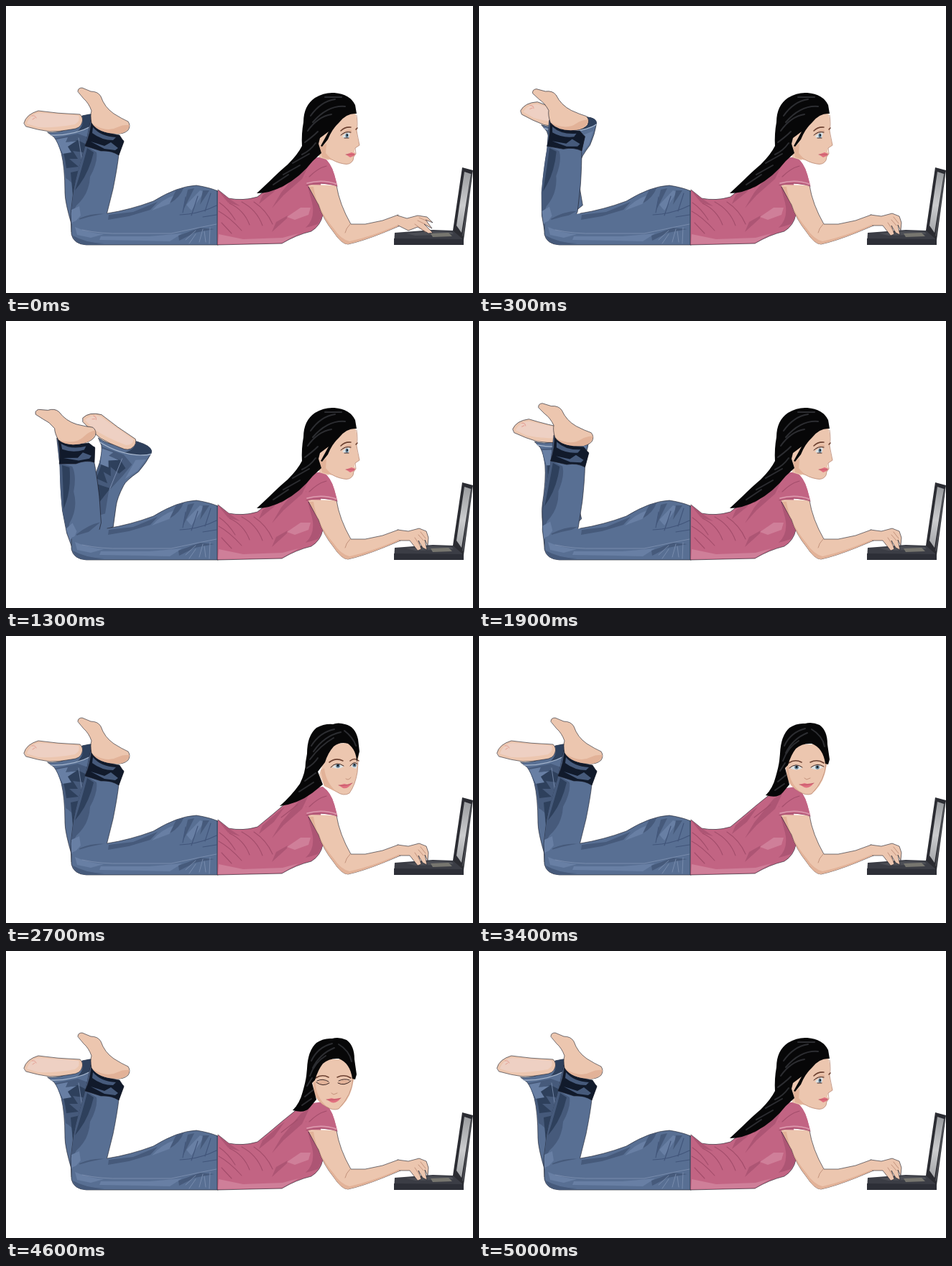
These frames come from a looping animation (650 px wide and 400 px high, 5.1 s). An HTML page without scripts:

```html
<!DOCTYPE html>
<html lang="en">
<head>
<meta charset="utf-8">
<title>Lying at the laptop</title>
<style>
html, body { margin: 0; width: 100%; height: 100%; overflow: hidden; background: #fff; }
svg { display: block; width: 650px; height: 400px; }

@property --swing { syntax: "<number>"; inherits: true; initial-value: 0; }

/* Denim */
.jean { fill: #586f93; }
.deep { fill: #465a7b; }
.navy { fill: #2e405c; }
.ink { fill: #111a2b; }
.pale { fill: #687fa4; }
.seam { fill: none; stroke: #8093b4; stroke-width: .8; }
.hem { fill: none; stroke: #a9b9d0; stroke-width: 1.2; }
.crease { fill: none; stroke: #41557a; stroke-width: 1.1; }
/* Shirt */
.shirt { fill: #c26483; }
.plum { fill: #ad5574; }
.rose { fill: #cf7f99; }
.fold { fill: none; stroke: #a34d6b; stroke-width: 1.1; }
/* Skin and face */
.skin { fill: #ecc6af; }
.tan { fill: #e2b298; }
.glow { fill: #eed0c3; }
.brow { fill: none; stroke: #6d4232; stroke-width: 1.6; }
.line { fill: none; stroke: #b17c66; stroke-width: .7; }
.lash { fill: none; stroke: #3a2726; stroke-width: 1; }
.lips { fill: #e0707f; }
.mouth { fill: none; stroke: #a8475a; stroke-width: .6; }
.iris { fill: #5d7a90; }
.hair { fill: #070708; }
.shine { fill: none; stroke: #2c2d31; stroke-width: 2; }
.edge { stroke: #1a1c28; stroke-width: .6; }
.white { fill: #dde2e4; }
path { stroke-linejoin: round; stroke-linecap: round; }

/* Motion */
svg { animation: swing 5100ms step-end infinite; }
.near { transform-origin: 105px 310px; transform: rotate(calc(var(--swing) * -1deg)); }
.far { transform-origin: 117px 298px; transform: rotate(calc(var(--swing) * 1.71deg)); }
.profile, .turned, .front, .open, .shut, .tap, .lift, .rest { animation: 5100ms step-end infinite; }
.profile { animation-name: profile; }
.turned { animation-name: turned; }
.front { animation-name: front; }
.open { animation-name: open; }
.shut { animation-name: shut; }
.tap { animation-name: tap; }
.lift { animation-name: lift; }
.rest { animation-name: rest; }

@keyframes swing {
  0% { --swing: 0; } 1.96% { --swing: 2.55; } 3.92% { --swing: 5.1; } 5.88% { --swing: 7.65; }
  9.8% { --swing: 10.2; } 11.76% { --swing: 12.75; } 13.72% { --swing: 15.3; }
  17.64% { --swing: 17.1; } 19.6% { --swing: 18.9; } 21.56% { --swing: 20.6; }
  25.49% { --swing: 18; } 27.45% { --swing: 15.5; } 29.41% { --swing: 13; }
  33.33% { --swing: 10.5; } 35.29% { --swing: 8; } 37.25% { --swing: 5.2; }
  41.17% { --swing: 2.6; } 43.13%, 100% { --swing: 0; }
}
@keyframes profile { 0%, 98.03%, 100% { opacity: 1; } 52.94% { opacity: 0; } }
@keyframes turned { 0%, 58.82%, 98.03%, 100% { opacity: 0; } 52.94%, 92.15% { opacity: 1; } }
@keyframes front { 0%, 92.15%, 100% { opacity: 0; } 58.82% { opacity: 1; } }
@keyframes open {
  0%, 66.66%, 74.5%, 80.39%, 92.15%, 100% { opacity: 1; }
  64.7%, 72.54%, 78.43%, 90.19% { opacity: 0; }
}
@keyframes shut {
  0%, 66.66%, 74.5%, 80.39%, 92.15%, 100% { opacity: 0; }
  64.7%, 72.54%, 78.43%, 90.19% { opacity: 1; }
}
@keyframes tap {
  0%, 9.8%, 19.6%, 33.33% { opacity: 1; }
  1.96%, 11.76%, 21.56%, 35.29%, 100% { opacity: 0; }
}
@keyframes lift {
  0%, 5.88%, 17.64%, 29.41%, 100% { opacity: 0; }
  3.92%, 13.72%, 27.45% { opacity: 1; }
}
@keyframes rest {
  0%, 3.92%, 9.8%, 13.72%, 19.6%, 27.45%, 33.33% { opacity: 0; }
  1.96%, 5.88%, 11.76%, 17.64%, 21.56%, 29.41%, 35.29%, 100% { opacity: 1; }
}
</style>
</head>
<body>
<svg viewBox="0 0 650 400" role="img" aria-label="Woman lying down and typing on a laptop">
  <defs>
    <linearGradient id="panel" x1="0" y1="0" x2="0" y2="1">
      <stop offset="0" stop-color="#9b9da0"/><stop offset=".55" stop-color="#cbccce"/><stop offset="1" stop-color="#a3a5a8"/>
    </linearGradient>
  </defs>

  <g class="far">
    <path class="jean edge" d="M58 176Q86 179 106 153L116 151Q131 149 132 157 133 172 130 188 121 208 122 215 123 235 128 246L139 272 119 298 92 307Q82 274 82 260 82 226 77 205 73 191 67 183Z"/>
    <path class="deep" d="M69 184L100 178 117 184 114 204 108 232 120 262 108 274Q95 245 83 240 81 218 77 205Z"/>
    <path class="navy" d="M76 192L100 187 112 193 108 204 93 202 100 213 88 213 101 224 84 226Q82 208 76 192M90 232L108 228 105 252 93 264Z"/>
    <path class="pale" d="M118 176L130 168 128 188 119 206ZM70 186L86 183 83 190 98 188 86 196 91 204 79 206Z"/>
    <path class="navy" d="M98 176Q110 166 106 153L116 151Q131 149 132 157 123 168 98 176"/>
    <path class="hem" d="M62 180Q94 181 120 167 130 161 132 158"/>
    <path class="seam" d="M101 184L108 230"/>
    <path class="skin edge" d="M25 163Q28 151 45 146 72 150 103 151 108 156 106 162 104 171 91 172 75 175 61 175 45 173 28 168Z"/>
    <path class="glow" d="M29 164Q34 150 47 149L101 153Q104 160 96 165 70 170 45 169Z"/>
    <path d="M36 153q5-1 6 3m-5 2l3-2" fill="none" stroke="#e5a095" stroke-width="1"/>
  </g>

  <g class="near">
    <path class="jean edge" d="M118 160L164 188 157 207Q155 225 149 255L140 291 122 320 100 327 91 315 90 290 94 258Q103 220 110 198Z"/>
    <path class="deep" d="M118 160L109 200Q98 235 94 258L90 292 98 278Q116 262 117 238 128 218 126 204L113 196 122 180Z"/>
    <path class="navy" d="M113 198L122 204Q116 230 103 248L96 257Q106 225 113 198"/>
    <path class="pale" d="M91 284L102 279 104 292 96 301 106 310 95 318 91 307Z"/>
    <path class="deep" d="M102 296Q122 288 139 290L119 298 104 306Z"/>
    <path class="ink edge" d="M119 158Q124 170 142 177L158 180 164 189 157 208Q147 201 132 202L110 195Q118 178 119 158"/>
    <path class="deep" d="M121 169Q132 182 153 183L149 187Q133 187 120 177ZM118 189L137 195 146 190 156 198 152 201 137 199Z"/>
    <path class="skin edge" d="M100 119Q100 114 106 114L118 119Q128 119 132 126 137 141 150 150 161 157 170 161 174 167 170 173 164 179 153 178 129 177 119 163 117 152 119 146 115 135 108 129Z"/>
    <path class="tan" d="M120 164Q140 177 155 169 163 165 172 166 171 172 164 176 158 179 153 178 129 177 120 164"/>
  </g>

  <g id="thigh">
    <path class="jean" d="M91 302Q111 293 141 289 173 284 205 272 239 251 265 250 284 253 295 258L295 333 112 333Q94 332 91 318Z"/>
    <path class="edge" fill="none" d="M91 304V318Q94 332 112 333H295M141 289Q173 284 205 272 239 251 265 250 284 253 295 258"/>
    <path class="pale" d="M132 321L200 321 245 317 228 328 190 327 130 326ZM96 308Q114 316 136 318L118 323 99 319ZM210 278Q226 264 241 263L227 276 203 285ZM251 277L270 257 276 259 258 285Z"/>
    <path class="deep" d="M143 291L177 287 211 273 201 284 171 293 142 298ZM237 256L247 254Q242 267 228 275ZM253 256L262 254 246 286ZM274 257L283 257 270 277ZM93 320Q110 330 137 331L112 333Q96 331 93 320ZM240 320L270 309 290 311 263 316 241 327Z"/>
    <path class="crease" d="M250 266L246 288M267 265L258 292M285 261L277 286M274 294L293 291M242 291Q269 290 293 278"/>
    <path class="seam" d="M106 312Q133 318 164 317L230 317Q258 311 293 304M250 326L264 313M264 318L255 331M269 329L274 311M276 314L278 329M283 331L284 309"/>
  </g>

  <g id="torso">
    <path class="shirt" d="M295 256L310 268Q330 272 350 266L367 252 386 236 413 214 441 210Q452 218 457 235L461 250 438 247 441 291Q438 306 425 314 404 319 384 331L294 333Z"/>
    <path class="edge" fill="none" d="M295 256L310 268Q330 272 350 266L367 252 386 236 411 216M441 291Q438 306 425 314 404 319 384 331L294 333V257"/>
    <path class="plum" d="M295 257L310 268 326 279 309 274ZM357 264L380 244 388 238 373 259 352 276ZM410 227L422 220 412 241 386 264 370 282 383 260ZM420 252L437 260 441 292 434 304Q425 307 417 309 431 296 426 274ZM376 301L392 292 391 296 370 315Z"/>
    <path class="rose" d="M391 294L410 281 424 281 421 291 402 298ZM296 318L330 325 385 323 407 317 384 330 295 332Z"/>
    <path class="fold" d="M297 274Q309 282 319 298M296 286Q311 294 328 313M311 275Q331 284 339 305M328 273Q349 284 357 306M345 273Q363 285 371 304M300 302L314 317M383 253L406 235M418 238Q428 230 447 227"/>
  </g>

  <g id="laptop">
    <path fill="#3b3d45" d="M541 316L594 312 623 313 637 323 637 333H540Z"/>
    <path fill="#2d2f37" d="M540 324L637 325V333H540Z"/>
    <path fill="#4c4e55" d="M557 317L592 314 620 315 623 318 570 320Z"/>
    <path fill="#77766f" d="M591 317L616 316 621 321 594 322Z"/>
    <path fill="#2b2c32" d="M635 225L650 229 637 326 622 313Z"/>
    <path fill="url(#panel)" d="M638 231L647 234 634 316 627 306Z"/>
    <path fill="none" stroke="#65676c" stroke-width="1" d="M648 234L636 320"/>
  </g>

  <g id="arm">
    <path class="skin" d="M420 249L460 250Q464 276 480 304L500 304 524 299 546 291 549 306 525 316Q495 328 476 332 467 332 456 315 442 298 435 277Z"/>
    <path class="edge" fill="none" d="M460 250Q464 276 480 304L500 304 524 299 546 291M549 306L525 316Q495 328 476 332 467 332 456 315 442 298 435 277L421 252"/>
    <path class="tan" d="M422 252L428 252Q432 281 456 310 466 325 478 328 510 321 548 304L548 306 525 316Q495 328 476 332 467 332 456 315 442 298 435 277Z"/>
    <path class="line" d="M479 304Q473 310 472 316"/>
    <path class="shirt" d="M441 211Q452 217 457 235L461 250 441 246 418 250 418 236Q425 220 441 211"/>
    <path fill="none" stroke="#dd9db0" stroke-width="1.6" d="M419 247Q440 241 460 248"/>
    <path class="fold" d="M418 250Q439 244 461 251M422 238Q434 226 446 223"/>
  </g>

  <g id="hand">
    <g class="tap">
      <path class="skin edge" d="M545 292L558 296 573 292 586 294 594 302 584 298 593 310 582 304 594 316 588 317 573 308 560 313 546 306"/>
      <path class="line" d="M573 299L583 304M569 304L584 315M575 295L587 300"/>
    </g>
    <g class="lift">
      <path class="skin edge" d="M545 292L558 285 573 281 584 284 590 290 577 288 591 298 588 301 576 294 583 303 576 302 567 299 557 305 546 306"/>
      <path class="line" d="M567 287L578 289M565 291L577 295M563 296L574 301"/>
    </g>
    <g class="rest">
      <path class="skin edge" d="M545 291L560 293 575 289 585 293 588 302 587 313 583 305 586 319 580 316 574 306 578 318 573 320 562 306 548 306"/>
      <path class="line" d="M574 298L581 306M569 302L577 314M577 294L584 303"/>
    </g>
  </g>

  <g class="profile">
    <path class="skin" d="M485 146Q490 158 488 172L489 182 492 194 486 198 485 203 487 206 484 210 483 215Q479 222 470 220 458 218 449 211L449 215 436 211 434 186 457 160 470 150Z"/>
    <path class="line" d="M488 152Q490 165 488 174L492 194 486 198 487 206 484 210 483 215Q479 222 470 220 458 218 449 211"/>
    <path class="tan" d="M437 196L446 192 445 205 454 215 440 211Z"/>
    <path class="brow" d="M466 174Q472 168 480 169M487 172L489 170"/>
    <path class="tan" d="M467 180Q473 170 481 173L480 178Z"/>
    <path class="white" d="M468 182Q473 175 479 177L477 184 471 184Z"/>
    <ellipse class="iris" cx="474.5" cy="180.5" rx="2" ry="3"/><circle cx="475" cy="180" r="1"/>
    <path class="lash" d="M466 180Q472 174 480 176M471 184L477 184"/>
    <path class="lips" d="M473 207L481 204 486 206 484 209 479 211Z"/>
    <path class="mouth" d="M473 207L485 207"/>
    <path class="hair" d="M414 162Q414 139 430 128 443 120 457 121 479 123 486 138L488 150Q474 149 464 162 454 171 448 186L440 196 438 195 449 175 437 184 435 192 439 205 427 216Q410 238 386 251 367 261 349 261L366 245Q380 231 392 221 406 207 412 195 411 178 414 162"/>
    <path class="shine" d="M424 153Q438 133 458 130M427 162Q448 138 472 140M420 174Q434 154 453 151M416 190Q427 182 434 175M412 207Q423 202 431 191M399 219L422 206M386 235L409 222M372 249L393 235M444 127L467 127"/>
  </g>

  <g class="turned">
    <path class="skin" d="M448 151L486 148 491 165 489 189Q486 208 478 219 470 224 460 217L443 209 436 193 442 175Z"/>
    <path class="line" d="M490 176L489 190Q486 208 478 219 470 224 460 217L443 208"/>
    <path class="tan" d="M438 187L443 184Q445 204 460 217L443 209Z"/>
    <path class="brow" d="M450 176Q459 169 469 174M479 174Q485 169 491 174"/>
    <path class="white" d="M454 183Q461 175 470 182 463 187 454 183M480 182Q484 176 489 180L487 185Z"/>
    <circle class="iris" cx="462" cy="181" r="2.8"/><circle cx="462" cy="180.5" r="1.2"/>
    <circle class="iris" cx="485" cy="180" r="2.6"/><circle cx="485" cy="179.5" r="1.1"/>
    <path class="lash" d="M452 183Q460 174 470 181M479 181Q484 174 489 178"/>
    <path class="line" d="M473 199Q477 202 480 197"/>
    <path class="lips" d="M463 208L471 206 475 207 482 205Q475 214 469 212Z"/>
    <path class="mouth" d="M463 208Q472 210 482 205"/>
    <path class="hair" d="M419 164Q419 139 432 128 443 122 455 123 462 120 472 123 486 126 490 144L492 161 488 176Q488 159 476 150 465 147 456 154 448 163 444 176L434 189 441 207 426 219Q406 234 381 237 397 223 409 206 417 190 417 176Z"/>
    <path class="shine" d="M425 153Q437 134 457 130M428 161Q443 139 466 134M423 172Q438 152 456 142M419 184Q429 178 434 170M416 202L431 191M408 217L428 204M471 132Q483 141 487 153"/>
  </g>

  <g class="front">
    <path class="skin" d="M440 151H475L485 175 481 193Q476 210 463 220 455 223 446 217 432 209 429 198L426 181Z"/>
    <path class="line" d="M483 178Q482 200 463 220 455 223 446 217 432 209 429 195"/>
    <path class="tan" d="M428 184L431 181Q430 203 448 218 432 210 429 198Z"/>
    <path class="brow" d="M431 177Q440 171 449 176M461 176Q471 171 480 177"/>
    <path class="line" d="M453 198L456 200 461 198"/>
    <path class="lips" d="M446 207L453 205 457 206 466 205Q460 213 453 211Z"/>
    <path class="mouth" d="M446 207Q456 209 466 205"/>
    <g class="open">
      <path class="white" d="M433 184Q441 177 450 184 441 189 433 184M462 184Q470 177 479 183 471 189 462 184"/>
      <g class="iris"><circle cx="442" cy="183" r="2.8"/><circle cx="471" cy="183" r="2.8"/></g>
      <circle cx="442" cy="182.5" r="1.2"/><circle cx="471" cy="182.5" r="1.2"/>
      <path class="lash" d="M432 184Q441 176 450 183M462 183Q471 176 480 182"/>
    </g>
    <g class="shut">
      <path class="tan" d="M433 184Q441 176 450 184 441 190 433 184M462 184Q470 176 479 183 471 189 462 184"/>
      <path class="lash" d="M432 183Q441 190 450 184M462 184Q471 189 480 181M433 181Q441 177 449 182M463 181Q471 177 478 180"/>
    </g>
    <path class="hair" d="M419 164Q420 139 432 128 442 121 454 122 463 119 474 124 485 132 485 151L488 172 486 179 482 178Q479 156 463 150 450 149 441 157 434 166 430 180L426 184 432 207 423 218Q416 227 399 222 409 212 413 196 417 182 418 174Z"/>
    <path class="shine" d="M425 153Q434 134 454 129M427 163Q437 143 457 135M423 174Q430 155 445 146M419 188L426 177M416 203L427 194M412 215L425 206M463 130Q478 139 481 154"/>
  </g>
</svg>
</body>
</html>
```
